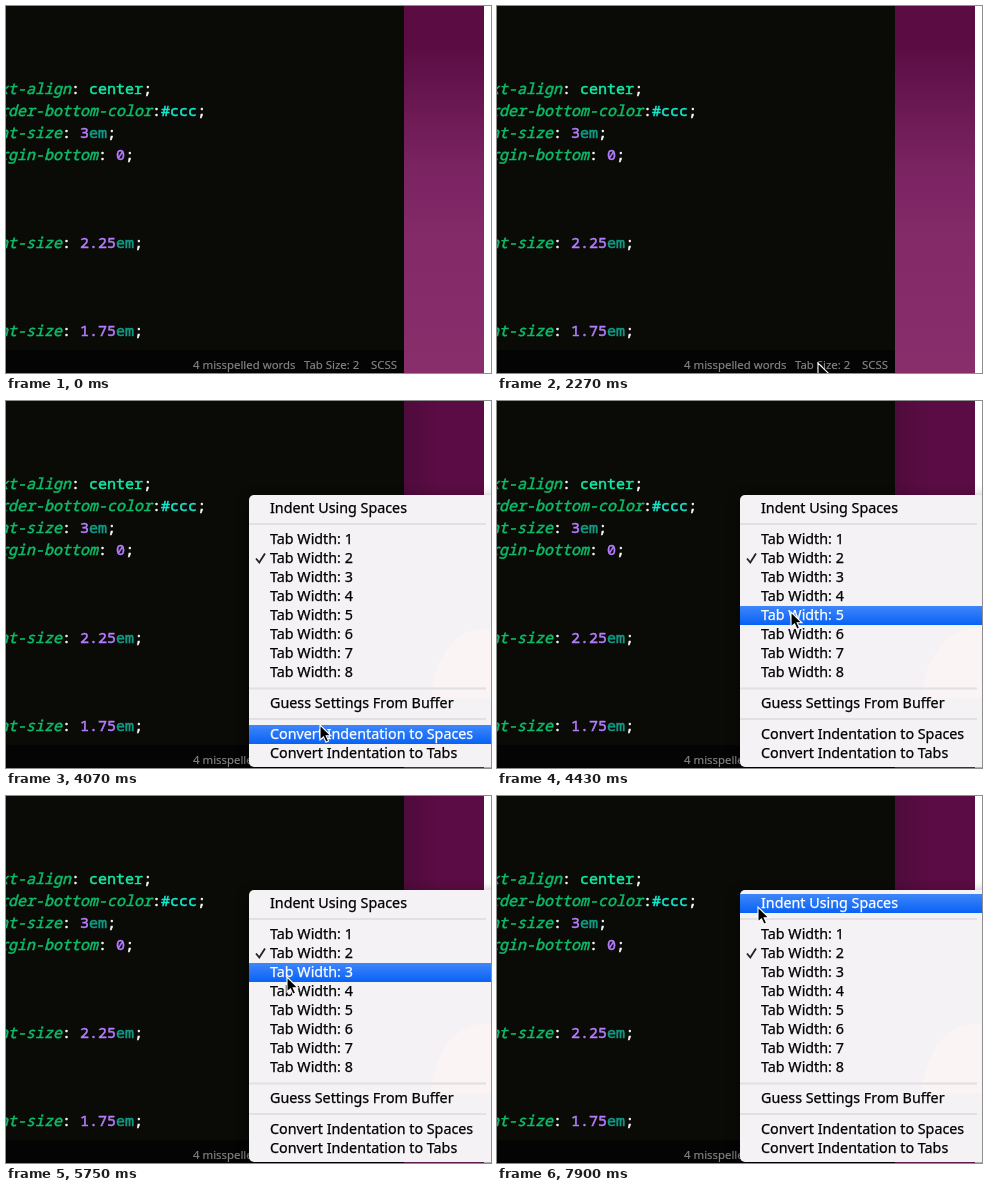
Write an HTML page that moves like this. It is 485x367 px and loops after 8000 ms.

```html
<!DOCTYPE html>
<html lang="en">
<head>
<meta charset="utf-8">
<title>Tab width menu</title>
<style>
  html, body { margin: 0; width: 100%; height: 100%; overflow: hidden; background: #fff; }
  svg { display: block; width: 485px; height: 367px; }
  text { white-space: pre; font-kerning: none; fill: currentColor; stroke: currentColor; }
  tspan { fill: currentColor; stroke: currentColor; }
  .code { font: 500 15px "Noto Sans Mono", "DejaVu Sans Mono", monospace; color: #fff; stroke-width: .5; }
  .prop { font-style: italic; color: #0cbc68; }
  .value { color: #16e8a6; }
  .hex { color: #14ead0; }
  .num { color: #b67cff; }
  .unit { color: #109c86; }
  .status { font: 11.4px "Noto Sans", "Open Sans", sans-serif; color: #858585; stroke-width: .15; }
  .item { font: 500 14.3px "Noto Sans", "Open Sans", sans-serif; color: #000; stroke-width: .25; }
  .item.on { color: #fff; }
  #panel { filter: drop-shadow(0 4px 7px rgba(0, 0, 0, .45)); }
</style>
</head>
<body>
<svg viewBox="0 0 485 367">
  <defs>
    <linearGradient id="wall" x2="0" y2="1">
      <stop offset=".11" stop-color="#5b0d43"/>
      <stop offset=".44" stop-color="#7a2462"/>
      <stop offset=".64" stop-color="#842a69"/>
      <stop offset="1" stop-color="#882e6b"/>
    </linearGradient>
    <linearGradient id="dusk">
      <stop offset="0" stop-color="#4f0b3c"/>
      <stop offset=".45" stop-color="#5b0c44"/>
    </linearGradient>
    <linearGradient id="blue" x2="0" y2="1">
      <stop offset="0" stop-color="#3f86fa"/>
      <stop offset="1" stop-color="#0862f5"/>
    </linearGradient>
  </defs>
  <rect width="485" height="367" fill="#fff"/>
  <rect width="398" height="367" fill="#0a0b07"/>
  <rect y="344" width="398" height="23" fill="#040404"/>
  <rect x="398" width="80" height="367" fill="url(#wall)"/>
  <g id="editor"></g>
  <g id="menu">
    <rect x="398" width="80" height="110" fill="url(#dusk)"/>
    <rect id="panel" x="243" y="94" width="260" height="272" rx="5" fill="#f4f2f4"/>
    <path id="tint" d="M425 297C428 255 450 230 474 228H485V297Z" fill="#faf4f5"/>
    <path d="M243 123H480M243 287.5H480M243 318H480" stroke="#e2e0e2" stroke-width="2"/>
    <rect id="bar" x="243" width="242" height="19" fill="url(#blue)"/>
    <path id="check" d="M250 157.5L253.3 161.5L259 152.5" fill="none" stroke-width="1.8"/>
    <g id="items"></g>
  </g>
  <path id="cursor" d="M0 0V15L3.5 11.8L6 17.2L8.6 16L6.2 10.8H11Z" fill="#000" stroke="#fff" stroke-width="1.1"/>
</svg>
<script>
const LOOP = 8000, STEP = 119.7, OPEN = 25, HOVER = 33, ROW = 19;
const el = id => document.getElementById(id);

function put(tag, parent, attrs, content) {
  const node = document.createElementNS("http://www.w3.org/2000/svg", tag);
  for (const key in attrs) node.setAttribute(key, attrs[key]);
  if (content) node.textContent = content;
  return parent.appendChild(node);
}

// Each line: baseline, then [class, text] runs
const size = (n, y) => [y, ["prop", "font-size"], ["", ": "], ["num", n], ["unit", "em"], ["", ";"]];
const code = [
  [88, ["prop", "text-align"], ["", ": "], ["value", "center"], ["", ";"]],
  [110, ["prop", "border-bottom-color"], ["", ":"], ["hex", "#ccc"], ["", ";"]],
  size("3", 132),
  [154, ["prop", "margin-bottom"], ["", ": "], ["num", "0"], ["", ";"]],
  size("2.25", 242),
  size("1.75", 330)
];
for (const [y, ...runs] of code) {
  const line = put("text", el("editor"), { class: "code", x: -25, y });
  for (const [name, text] of runs) put("tspan", line, { class: name }, text);
}
for (const [x, text] of [[187, "4 misspelled words"], [298, "Tab Size: 2"], [365, "SCSS"]])
  put("text", el("editor"), { class: "status", x, y: 363 }, text);

const rows = [[98, "Indent Using Spaces"]];
for (let n = 1; n <= 8; n++) rows.push([110 + n * ROW, "Tab Width: " + n]);
rows.push([293, "Guess Settings From Buffer"], [324, "Convert Indentation to Spaces"],
  [343, "Convert Indentation to Tabs"]);
const items = rows.map(([top, text]) =>
  put("text", el("items"), { class: "item", x: 264, y: top + 14 }, text));

// Pointer path: step, x, y
const path = [
  [4, 192, 277], [7, 260, 320], [10, 306, 346], [12, 306, 346], [14, 311, 342],
  [17, 323, 353], [19, 321, 357], [32, 321, 357], [34, 314, 324], [37, 294, 211],
  [39, 284, 180], [42, 282, 141], [43, 282, 141], [46, 281, 178], [48, 281, 181],
  [50, 282, 202], [54, 282, 202], [57, 281, 141], [61, 256, 113], [65, 256, 113],
  [66, 261, 111]
];

function pointer(k) {
  let i = 1;
  while (i < path.length - 1 && path[i][0] < k) i++;
  const [a, ax, ay] = path[i - 1], [b, bx, by] = path[i];
  const u = Math.min(1, Math.max(0, (k - a) / (b - a)));
  return [Math.round(ax + (bx - ax) * u), Math.round(ay + (by - ay) * u)];
}

const show = (id, on) => { el(id).style.display = on ? "" : "none"; };

function draw(t) {
  const k = Math.floor((t + 6) / STEP);
  const [x, y] = pointer(k);
  const hit = k < HOVER ? -1 : rows.findIndex(([top]) => y >= top && y < top + ROW);
  show("cursor", k >= path[0][0]);
  show("menu", k >= OPEN);
  show("tint", k >= HOVER);
  show("bar", hit >= 0);
  if (hit >= 0) el("bar").setAttribute("y", rows[hit][0]);
  items.forEach((item, i) => item.classList.toggle("on", i === hit));
  el("check").setAttribute("stroke", hit === 2 ? "#fff" : "#222");
  el("cursor").setAttribute("transform", `translate(${x} ${y})`);
}

const start = performance.now();
function tick(now) {
  draw(Math.max(0, now - start) % LOOP);
  requestAnimationFrame(tick);
}
draw(0);
requestAnimationFrame(tick);
</script>
</body>
</html>
```
